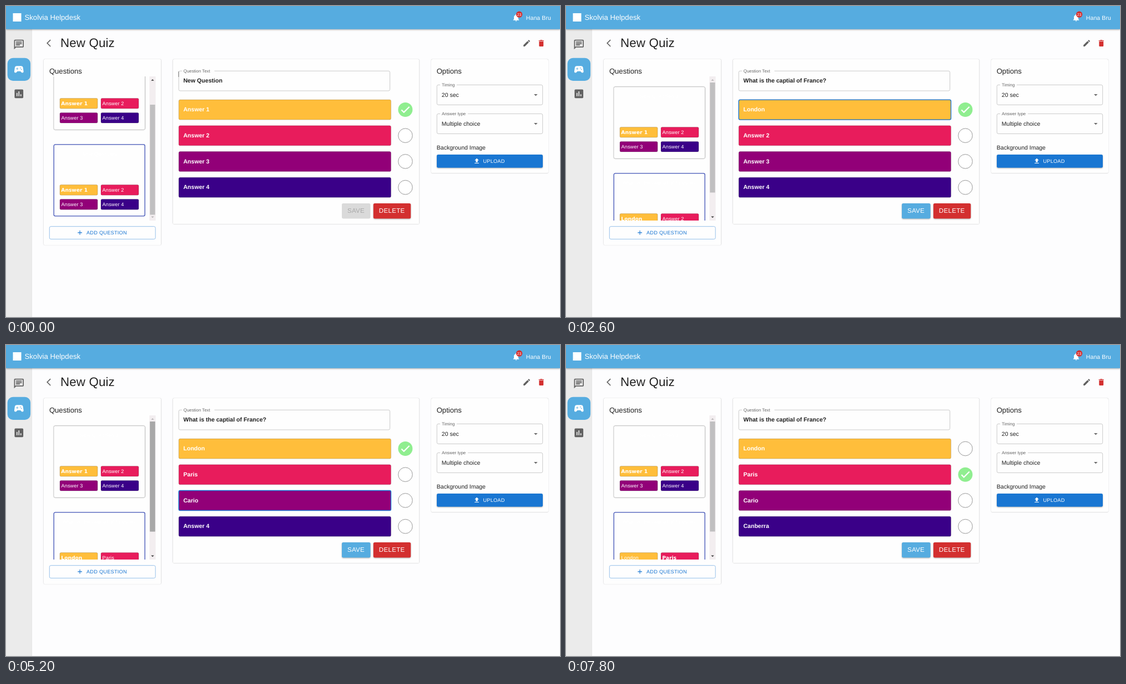
An HTML page for the animation above (8 s loop, 998 by 561 pixels).

```html
<!DOCTYPE html>
<html lang="en">
<head>
<meta charset="utf-8">
<title>Quiz editor</title>
<style>
@property --step { syntax: "<integer>"; inherits: true; initial-value: 0; }
@keyframes steps {
  0% { --step: 0; }
  16.25% { --step: 1; }
  32.5% { --step: 2; }
  48.75% { --step: 3; }
  65% { --step: 4; }
  81.25% { --step: 5; }
  97.5%, to { --step: 6; }
}
html, body { margin: 0; width: 100%; height: 100%; overflow: hidden; background: #fdfdfe; }
svg {
  display: block; width: 998px; height: 561px;
  font: 10.5px "Liberation Sans", Arial, sans-serif;
  text-rendering: geometricPrecision;
  animation: steps 8s step-end infinite;
}
text { fill: #212121; white-space: pre; }
/* visible from step --a up to, not including, step --b */
.t { opacity: min(var(--step) - var(--a, 0) + 1, var(--b, 7) - var(--step)); }
.list { transform: translateY(calc(-52px * max(0, 1 - var(--step)))); }
.thumb { transform: translateY(calc(40px * max(0, 1 - var(--step)))); fill: #c0bfc0; }
.card { fill: #fefefe; filter: drop-shadow(0 .65px .5px rgba(0,0,0,.28)) drop-shadow(0 .5px .9px rgba(0,0,0,.12)); }
.raised { filter: drop-shadow(0 1px .8px rgba(0,0,0,.3)); }
.line { fill: none; stroke: #c4c4c4; stroke-width: .9; }
.focus { fill: none; stroke: #1976d2; stroke-width: 1.4; }
.edge { stroke: rgba(0,0,0,.25); stroke-width: .7; }
.notch { fill: #fefefe; }
.h { font-size: 13.1px; }
.label { font-size: 7.86px; fill: #666; }
.title { font-size: 9.17px; font-weight: 700; letter-spacing: .065px; text-anchor: middle; }
.chip text { font-size: 9.17px; letter-spacing: .0107em; fill: #fff; }
.chip .right { font: 700 9.17px "DejaVu Sans", sans-serif; letter-spacing: 0; }
.field { font-weight: 700; font-size: 10.55px; }
.white { fill: #fff; }
.btn { font-size: 9.17px; letter-spacing: .02857em; fill: #fff; }
.big { font-size: 11.5px; }
.blue { fill: #1976d2; }
.c1 { fill: #ffbe3b; } .c2 { fill: #e81c5c; } .c3 { fill: #920078; } .c4 { fill: #3a0088; }
.sky { fill: #56ace0; }
.red { fill: #d32f2f; }
.icon { fill: #616161; }
</style>
</head>
<body>
<svg viewBox="0 0 998 561">
  <defs>
    <clipPath id="listBox"><rect x="78" y="127" width="180" height="260"/></clipPath>
    <g id="chips" class="edge">
      <rect class="c1" x="97" y="72.7" width="68" height="18.6" rx="2"/>
      <rect class="c2" x="171" y="72.7" width="68" height="18.6" rx="2"/>
      <rect class="c3" x="97" y="98.7" width="68" height="18.6" rx="2"/>
      <rect class="c4" x="171" y="98.7" width="68" height="18.6" rx="2"/>
    </g>
    <rect id="row" x="311.2" y="169.1" width="382.3" height="36" rx="2.6"/>
    <circle id="radio" cx="719.4" cy="187" r="12.8" fill="#fff" stroke="#8c8c8c" stroke-width=".9"/>
    <g id="checked">
      <circle cx="719.4" cy="187" r="13" fill="#90ee90"/>
      <path transform="translate(709 176.6) scale(.86)" fill="#fff" stroke="#fff" stroke-width=".8" d="M9 16.17 4.83 12l-1.42 1.41L9 19 21 7l-1.41-1.41z"/>
    </g>
    <path id="drop" d="M951 158.9l3.3 3.3 3.3-3.3z" fill="#6b6b6b"/>
  </defs>

  <rect width="998" height="561" fill="#fdfdfe"/>

  <!-- sidebar -->
  <rect width="46.6" height="561" fill="#ebebeb" style="filter:drop-shadow(.5px 0 .7px rgba(0,0,0,.2))"/>
  <rect class="sky" x="2.6" y="93.8" width="41.5" height="41.2" rx="10"/>
  <path class="icon" transform="translate(12.8 59.1) scale(.873)" d="M4 4h16v12H5.17L4 17.17V4m0-2c-1.1 0-1.99.9-1.99 2L2 22l4-4h14c1.1 0 2-.9 2-2V4c0-1.1-.9-2-2-2H4zm2 10h8v2H6v-2zm0-3h12v2H6V9zm0-3h12v2H6V6z"/>
  <path class="white" transform="translate(12.8 103.9) scale(.873)" d="M21.58 16.09l-1.09-7.66C20.21 6.46 18.52 5 16.53 5H7.47C5.48 5 3.79 6.46 3.51 8.43l-1.09 7.66C2.2 17.63 3.39 19 4.94 19c.68 0 1.32-.27 1.8-.75L9 16h6l2.25 2.25c.48.48 1.13.75 1.8.75 1.56 0 2.75-1.37 2.53-2.91zM11 11H9v2H8v-2H6v-1h2V8h1v2h2v1zm4-1c-.55 0-1-.45-1-1s.45-1 1-1 1 .45 1 1-.45 1-1 1zm2 3c-.55 0-1-.45-1-1s.45-1 1-1 1 .45 1 1-.45 1-1 1z"/>
  <path class="icon" transform="translate(12.8 148) scale(.873)" d="M19 3H5c-1.1 0-2 .9-2 2v14c0 1.1.9 2 2 2h14c1.1 0 2-.9 2-2V5c0-1.1-.9-2-2-2zM9 17H7v-7h2v7zm4 0h-2V7h2v10zm4 0h-2v-4h2v4z"/>

  <!-- top bar -->
  <rect class="sky" width="998" height="41.8" style="filter:drop-shadow(0 1.4px 1.6px rgba(0,0,0,.35))"/>
  <rect class="white" x="12.5" y="13" width="15" height="15"/>
  <text class="h white" x="33.6" y="25.4">Skolvia Helpdesk</text>
  <path class="white" transform="translate(911.1 13.2) scale(.655)" d="M12 22c1.1 0 2-.9 2-2h-4c0 1.1.89 2 2 2zm6-6v-5c0-3.07-1.64-5.64-4.5-6.32V4c0-.83-.67-1.5-1.5-1.5s-1.5.67-1.5 1.5v.68C7.63 5.36 6 7.92 6 11v5l-2 2v1h16v-1l-2-2z"/>
  <circle class="red" cx="924.6" cy="15.2" r="5.6"/>
  <text class="white" x="924.6" y="17.6" font-size="6.8" text-anchor="middle">23</text>
  <text class="white" x="936.8" y="24.5" letter-spacing=".1">Hana Bru</text>

  <!-- page heading -->
  <path class="icon" transform="translate(69.1 59.2) scale(.655)" d="M17.77 3.77 16 2 6 12l10 10 1.77-1.77L9.54 12z"/>
  <text x="98" y="74.4" font-size="22.3" letter-spacing=".16">New Quiz</text>
  <path class="icon" transform="translate(930.2 59.3) scale(.655)" d="M3 17.25V21h3.75L17.81 9.94l-3.75-3.75L3 17.25zM20.71 7.04c.39-.39.39-1.02 0-1.41l-2.34-2.34c-.39-.39-1.02-.39-1.41 0l-1.83 1.83 3.75 3.75 1.83-1.83z"/>
  <path class="red" transform="translate(956.4 59.3) scale(.655)" d="M6 19c0 1.1.9 2 2 2h8c1.1 0 2-.9 2-2V7H6v12zM19 4h-3.5l-1-1h-5l-1 1H5v2h14V4z"/>

  <!-- question list -->
  <rect class="card" x="67.8" y="96" width="211.7" height="335" rx="2.6"/>
  <text class="h" x="77.9" y="121.7">Questions</text>
  <g clip-path="url(#listBox)">
    <g class="list">
      <g class="chip" transform="translate(0 145.8)">
        <rect class="card edge" x="86" width="164.5" height="129.4" rx="2.6"/>
        <text class="title" x="168" y="19.8">New Question 1</text>
        <use href="#chips"/>
        <text class="right" x="99.3" y="85.3">Answer 1</text>
        <text x="173.5" y="85.3">Answer 2</text>
        <text x="99.5" y="111.2">Answer 3</text>
        <text x="173.5" y="111.2">Answer 4</text>
      </g>
      <g class="chip" transform="translate(0 301.9)">
        <rect x="86.2" width="164" height="129" rx="2.6" fill="#fefefe" stroke="#3f51b5" stroke-width="1.3"/>
        <text class="title t" style="--b:1" x="168" y="19.8">New Question</text>
        <text class="title t" style="--a:1" x="168" y="19.8">What is the captial of France?</text>
        <use href="#chips"/>
        <text class="right t" style="--b:2" x="99.3" y="85.3">Answer 1</text>
        <text class="right t" style="--a:2;--b:6" x="99.3" y="85.3">London</text>
        <text class="t" style="--a:6" x="99.5" y="85.3">London</text>
        <text class="t" style="--b:3" x="173.5" y="85.3">Answer 2</text>
        <text class="t" style="--a:3;--b:6" x="173.5" y="85.3">Paris</text>
        <text class="right t" style="--a:6" x="173.3" y="85.3">Paris</text>
        <text x="99.5" y="111.2">Answer 3</text>
        <text x="173.5" y="111.2">Answer 4</text>
      </g>
    </g>
  </g>
  <rect x="258.4" y="127" width="11.2" height="260" fill="#f3eef0"/>
  <g class="thumb">
    <rect x="259.3" y="138" width="9.3" height="198.5"/>
    <rect class="t" style="--a:4;--b:5" x="259.3" y="138" width="9.3" height="198.5" fill="#a8a8a8"/>
  </g>
  <path d="M261.4 134.7h5.2l-2.6-2.8zM261.4 379.4h5.2l-2.6 2.8z" fill="#b9b5b7"/>
  <path class="t" style="--b:1" d="M261.4 134.7h5.2l-2.6-2.8z" fill="#484848"/>
  <path class="t" style="--a:1" d="M261.4 379.4h5.2l-2.6 2.8z" fill="#484848"/>
  <rect x="78.3" y="397.7" width="190.9" height="22.8" rx="2.6" fill="none" stroke="#8cbae8" stroke-width=".9"/>
  <path d="M129.2 408.9h7.8M133.1 405v7.8" stroke="#1976d2" stroke-width="1.1"/>
  <text class="btn blue" x="145" y="412">ADD QUESTION</text>

  <!-- question form -->
  <rect class="card" x="300.6" y="96" width="443.9" height="297.3" rx="2.6"/>
  <rect class="line" x="311.2" y="117.2" width="380.4" height="35.8" rx="2.6"/>
  <path class="t" style="--b:1" d="M311 118v10" stroke="#777" stroke-width="1"/>
  <rect class="focus t" style="--a:1;--b:2" x="311.2" y="117.2" width="380.4" height="35.8" rx="2.6"/>
  <rect class="notch" x="317" y="115" width="58.5" height="4.5"/>
  <text class="label" x="319.8" y="119.6">Question Text</text>
  <text class="label blue t" style="--a:1;--b:2" x="319.8" y="119.6">Question Text</text>
  <text class="field t" style="--b:1" x="319.5" y="138.3">New Question</text>
  <text class="field t" style="--a:1" x="319.5" y="138.3">What is the captial of France?</text>
  <path class="t" style="--a:1;--b:2" d="M470 128.5v11.5" stroke="#222" stroke-width=".8"/>

  <g>
    <use href="#row" class="c1 edge"/>
    <use href="#row" class="focus t" style="--a:2;--b:3"/>
    <text class="field white t" style="--b:2" x="319.5" y="190.2">Answer 1</text>
    <text class="field white t" style="--a:2" x="319.5" y="190.2">London</text>
    <use href="#radio" class="t" style="--a:6"/>
    <use href="#checked" class="t" style="--b:6"/>
  </g>
  <g transform="translate(0 46.7)">
    <use href="#row" class="c2 edge"/>
    <use href="#row" class="focus t" style="--a:3;--b:4"/>
    <text class="field white t" style="--b:3" x="319.5" y="190.2">Answer 2</text>
    <text class="field white t" style="--a:3" x="319.5" y="190.2">Paris</text>
    <use href="#radio" class="t" style="--b:6"/>
    <use href="#checked" class="t" style="--a:6"/>
  </g>
  <g transform="translate(0 93.4)">
    <use href="#row" class="c3 edge"/>
    <use href="#row" class="focus t" style="--a:4;--b:5"/>
    <text class="field white t" style="--b:4" x="319.5" y="190.2">Answer 3</text>
    <text class="field white t" style="--a:4" x="319.5" y="190.2">Cario</text>
    <use href="#radio"/>
  </g>
  <g transform="translate(0 140.2)">
    <use href="#row" class="c4 edge"/>
    <use href="#row" class="focus t" style="--a:5;--b:6"/>
    <text class="field white t" style="--b:5" x="319.5" y="190.2">Answer 4</text>
    <text class="field white t" style="--a:5" x="319.5" y="190.2">Canberra</text>
    <path class="t" style="--a:5;--b:6" d="M366.6 180.5v11.5" stroke="#fff" stroke-width=".8"/>
    <use href="#radio"/>
  </g>

  <g class="t" style="--b:1">
    <rect x="605" y="356" width="51.5" height="27.4" rx="2.6" fill="#dadada"/>
    <text class="btn big" x="614.9" y="373.3" style="fill:#a8a8a8">SAVE</text>
  </g>
  <g class="t" style="--a:1">
    <rect class="sky raised" x="605" y="356" width="51.5" height="27.4" rx="2.6"/>
    <text class="btn big" x="614.9" y="373.3">SAVE</text>
  </g>
  <rect class="red raised" x="661.8" y="356" width="67.4" height="27.4" rx="2.6"/>
  <text class="btn big" x="671.8" y="373.3">DELETE</text>

  <!-- options -->
  <rect class="card" x="766" y="96" width="211" height="205.5" rx="2.6"/>
  <text class="h" x="775.7" y="121.7">Options</text>
  <rect class="line" x="776.3" y="142.3" width="190.4" height="36" rx="2.6"/>
  <rect class="notch" x="782" y="140" width="30" height="4.5"/>
  <text class="label" x="785" y="145.1">Timing</text>
  <text x="784.8" y="163.9">20 sec</text>
  <use href="#drop"/>
  <rect class="line" x="776.3" y="194.4" width="190.4" height="36" rx="2.6"/>
  <rect class="notch" x="782" y="192" width="50" height="4.5"/>
  <text class="label" x="785" y="197.2">Answer type</text>
  <text x="784.8" y="215.9">Multiple choice</text>
  <use href="#drop" y="52"/>
  <text x="775.8" y="258.7">Background Image</text>
  <rect class="blue raised" x="776" y="268" width="191" height="23.7" rx="2.6"/>
  <path class="white" transform="translate(841.5 273.1) scale(.546)" d="M5 20h14v-2H5v2zm0-4zm4 0h6v-6h4l-7-7-7 7h4z"/>
  <text class="btn" x="859.4" y="283">UPLOAD</text>
</svg>
</body>
</html>
```
